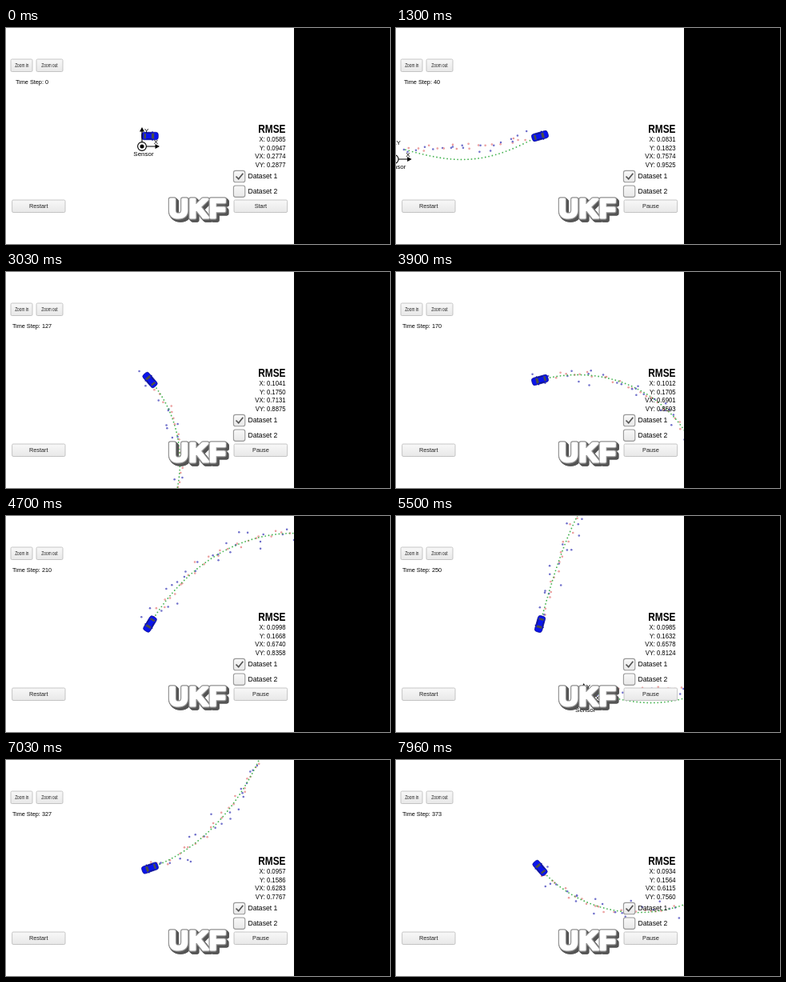
Animation, 480 px wide and 270 px high, one loop 8 s. Source, as an HTML page with a canvas:

```html
<!DOCTYPE html>
<html lang="en">
<head>
<meta charset="utf-8">
<title>Vehicle tracking</title>
<style>
  html, body { margin: 0; width: 100%; height: 100%; overflow: hidden; background: #fff; }
  canvas, svg { position: absolute; left: 0; top: 0; width: 480px; height: 270px; }
  text { font-family: "Liberation Sans", Arial, sans-serif; font-size: 7.3px; }
  .mid { text-anchor: middle; }
  .mid text { fill: #222; }
  .mid .zoom { font-size: 6.5px; }
  #step { fill: #000; }
  .stat { font-size: 9.9px; text-anchor: end; }
  .head { font-size: 15.2px; font-weight: bold; }
  .data { font-size: 8.6px; }
  .box { fill: url(#face); stroke: #b8b8b8; stroke-width: .8; }
  .check { fill: url(#face); stroke: #999; stroke-width: 1.1; }
  #title text { font-size: 33.5px; font-weight: bold; letter-spacing: 1px; stroke-linejoin: round; }
</style>
</head>
<body>
<canvas id="world"></canvas>
<svg viewBox="0 0 480 270">
  <defs>
    <linearGradient id="face" x2="0" y2="1">
      <stop offset="0" stop-color="#f8f8f8"/><stop offset="1" stop-color="#e8e8e8"/>
    </linearGradient>
  </defs>
  <g class="box">
    <rect x="6" y="39" width="27" height="15.5" rx="1.5"/>
    <rect x="38" y="39" width="33" height="15.5" rx="1.5"/>
    <rect x="7.6" y="215" width="66.4" height="15.5" rx="1.5"/>
    <rect x="285" y="215" width="66.6" height="15.5" rx="1.5"/>
  </g>
  <g class="check">
    <rect x="284.4" y="178.4" width="14.4" height="14.4" rx="2.6"/>
    <rect x="284.4" y="197" width="14.4" height="14.4" rx="2.6"/>
  </g>
  <path d="M287.5 185.5l3.2 3.3 5.6-7" fill="none" stroke="#555" stroke-width="1.7"/>
  <g class="mid">
    <text class="zoom" transform="translate(19.8 49.2) scale(.74 1)">Zoom in</text>
    <text class="zoom" transform="translate(54.5 49.2) scale(.74 1)">Zoom out</text>
    <text id="step" x="32.5" y="70"></text>
    <text x="40.8" y="225.4">Restart</text>
    <text id="action" x="318.4" y="225.4"></text>
  </g>
  <g transform="translate(349.5 0) scale(.78 1)">
    <text class="stat head" y="131.2">RMSE</text>
    <g id="stats"></g>
  </g>
  <text class="data" x="302.5" y="188">Dataset 1</text>
  <text class="data" x="302.5" y="207">Dataset 2</text>
  <g id="title"></g>
  <rect x="360" width="120" height="270"/>
</svg>
<script>
const LOOP = 8000, START = 500, LAST = 373, DT = 0.05;
const CAR = { x: 180, y: 135 }, SENSOR = { x: -10, y: 13 };
const METRE = 16.7;
const $ = id => document.getElementById(id);

// RMSE readings: step, X, Y, VX, VY
const readings = [
  [0, .0585, .0947, .2774, .2877],
  [40, .0831, .1823, .7574, .9525],
  [127, .1041, .1750, .7131, .8875],
  [170, .1012, .1705, .6901, .8593],
  [250, .0985, .1632, .6578, .8124],
  [327, .0957, .1586, .6283, .7767],
  [373, .0934, .1564, .6115, .7560]
];

let seed = 11;
function random() {
  seed = (seed * 16807) % 2147483647;
  return seed / 2147483647;
}
const gauss = () => Math.sqrt(-2 * Math.log(random())) * Math.cos(2 * Math.PI * random());

// Constant speed, sinusoidal yaw rate with a 25 s period
const SPEED = 5.2 * METRE;
const heading = t => 2.2215 * (1 - Math.cos(2 * Math.PI * t / 25));

function buildTrack() {
  const track = [];
  let x = 0, y = 0;
  for (let i = 0; i <= LAST; i++) {
    const rx = x - SENSOR.x, ry = y - SENSOR.y;
    const range = Math.hypot(rx, ry), bearing = Math.atan2(ry, rx);
    const laser = i % 2 === 0;
    const a = gauss(), b = gauss();
    const r = range + a * 0.3 * METRE, angle = bearing + b * 0.03;
    track.push({
      x, y, laser, angle: heading(i * DT),
      guessY: y + (i < 39 ? 15 * Math.sin(Math.PI * i / 39) : 0),
      seenX: laser ? x + a * 0.15 * METRE : SENSOR.x + r * Math.cos(angle),
      seenY: laser ? y + b * 0.15 * METRE : SENSOR.y + r * Math.sin(angle)
    });
    const course = heading((i + 0.5) * DT);
    x += SPEED * Math.cos(course) * DT;
    y -= SPEED * Math.sin(course) * DT;
  }
  return track;
}
const track = buildTrack();

const canvas = $("world"), ctx = canvas.getContext("2d");
const ratio = window.devicePixelRatio || 1;
canvas.width = 480 * ratio;
canvas.height = 270 * ratio;

function disc(x, y, r, fill) {
  ctx.beginPath();
  ctx.arc(x, y, r, 0, 7);
  ctx.fillStyle = fill;
  ctx.fill();
}

function shape(points, fill) {
  ctx.beginPath();
  points.forEach(p => ctx.lineTo(...p));
  ctx.closePath();
  ctx.fillStyle = fill;
  ctx.fill();
}

function drawTrail(step) {
  const passed = track.slice(1, step + 1);
  for (const p of passed) {
    disc(p.seenX, p.seenY, 1.25, p.laser ? "#e89090" : "#6a6ac8");
    disc(p.seenX, p.seenY, 0.5, p.laser ? "#f6c4c4" : "#8080d4");
  }
  for (const p of passed) disc(p.x, p.guessY, 0.9, "#45b350");
}

function drawCar({ x, y, angle }) {
  ctx.save();
  ctx.translate(x, y);
  ctx.rotate(-angle);
  ctx.fillStyle = "#0a0a80";
  ctx.fillRect(2.4, -5.7, 1.3, 11.4);
  ctx.beginPath();
  ctx.roundRect(-10.3, -4.7, 20.6, 9.4, 3);
  ctx.fillStyle = "#0a14ec";
  ctx.fill();
  ctx.strokeStyle = "#080a8c";
  ctx.lineWidth = 0.7;
  ctx.stroke();
  shape([[2, -2.9], [5.2, -3.7], [5.2, 3.7], [2, 2.9]], "#4c4e4a");
  shape([[-5, -2.8], [-7.4, -3.4], [-7.4, 3.4], [-5, 2.8]], "#4c4e4a");
  ctx.fillStyle = "#14187c";
  ctx.fillRect(-4.6, -4.1, 6.6, 0.9);
  ctx.fillRect(-4.6, 3.2, 6.6, 0.9);
  ctx.restore();
}

function drawSensor() {
  ctx.save();
  ctx.translate(SENSOR.x, SENSOR.y);
  ctx.strokeStyle = "#000";
  ctx.lineWidth = 1.1;
  ctx.beginPath();
  ctx.moveTo(0, -19);
  ctx.lineTo(0, 0);
  ctx.lineTo(18, 0);
  ctx.stroke();
  shape([[0, -24], [-3, -18.5], [3, -18.5]], "#000");
  shape([[22, 0], [16.5, -3], [16.5, 3]], "#000");
  disc(0, 0, 5.4, "#fff");
  ctx.beginPath();
  ctx.arc(0, 0, 5.4, 0, 7);
  ctx.stroke();
  disc(0, 0, 2.5, "#000");
  ctx.font = '8px "Liberation Sans", Arial, sans-serif';
  ctx.textAlign = "center";
  ctx.fillText("Y", 5.6, -17.5);
  ctx.fillText("X", 17.3, -3);
  ctx.fillText("Sensor", 2, 12);
  ctx.restore();
}

function rmseAt(step) {
  const i = Math.max(1, readings.findIndex(r => r[0] >= step));
  const from = readings[i - 1], to = readings[i];
  const part = (step - from[0]) / (to[0] - from[0]);
  return from.slice(1).map((v, n) => v + (to[n + 1] - v) * part);
}

function addText(parent, content, attributes) {
  const node = document.createElementNS("http://www.w3.org/2000/svg", "text");
  for (const name in attributes) node.setAttribute(name, attributes[name]);
  node.textContent = content;
  return $(parent).appendChild(node);
}

const statNames = ["X", "Y", "VX", "VY"];
const statNodes = statNames.map((_, i) => addText("stats", "", { class: "stat", y: 142.2 + 10.6 * i }));

// Block lettering: dark extrusion, grey rim, fat white face
function addTitle(offset, color, width) {
  addText("title", "UKF", {
    x: 203.5 + offset, y: 237 + offset, fill: color, stroke: color, "stroke-width": width
  });
}
for (let d = 3; d > 0; d -= 0.5) addTitle(d, "#555", 5.5);
addTitle(0, "#909090", 5.5);
addTitle(0, "#fff", 3.2);

function render() {
  const t = performance.now() % LOOP;
  const tick = Math.max(0, Math.floor((t - START + 7) * 0.015));
  const step = Math.min(LAST, Math.round(tick * 10 / 3));
  const car = track[step];

  ctx.setTransform(ratio, 0, 0, ratio, 0, 0);
  ctx.fillStyle = "#fff";
  ctx.fillRect(0, 0, 480, 270);
  ctx.translate(CAR.x - car.x, CAR.y - car.y);
  drawTrail(step);
  drawCar(car);
  drawSensor();

  $("step").textContent = "Time Step: " + step;
  $("action").textContent = t < START ? "Start" : "Pause";
  rmseAt(step).forEach((v, i) => statNodes[i].textContent = `${statNames[i]}: ${v.toFixed(4)}`);
  requestAnimationFrame(render);
}
render();
</script>
</body>
</html>
```
